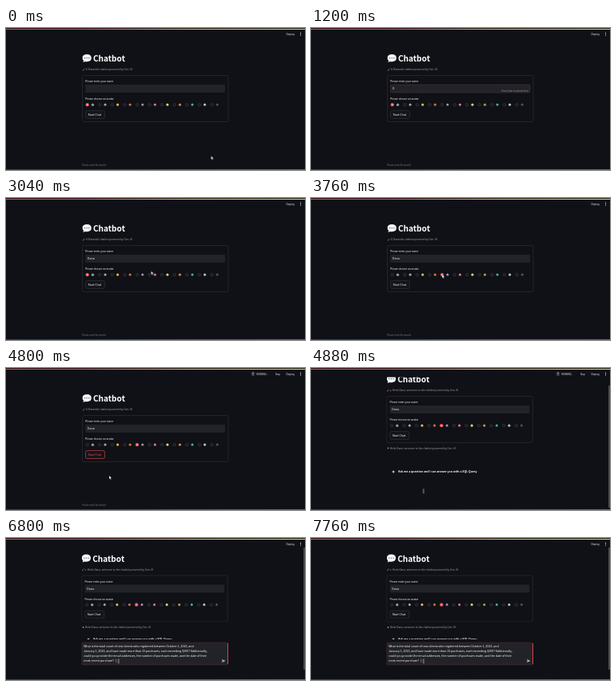
Recreate the animation shown at these times as an HTML page. Size 374 by 178 pixels, loop 8000 ms.

```html
<!DOCTYPE html>
<html lang="en">
<head>
<meta charset="utf-8">
<title>Chatbot</title>
<style>
html, body { margin: 0; width: 100%; height: 100%; overflow: hidden; background: #0f1116; }
svg { display: block; width: 100vw; height: 100vh; }
text { font: 500 3.2px "Noto Sans CJK JP", "Noto Sans CJK SC", "Open Sans", sans-serif; fill: #fff; white-space: pre; }
.h1 { font-size: 10.15px; font-weight: 700; }
.body { font-size: 3.6px; }
.bold { font-size: 3.5px; font-weight: 700; }
.tiny { font-size: 2.75px; }
.dim { fill: #a0a2a8; font-weight: 400; }
.faint { fill: #74767e; font-weight: 400; }
.field { fill: #222328; }

/* 1% of the loop is 80 ms */
.a { animation: 8s step-end infinite; }
.page { animation-name: page; }
.before { animation-name: before; }
.after { animation-name: after; }
.message { animation-name: message; }
.bar { animation-name: bar; }
.dock { animation-name: dock; }
.focus { animation-name: focus; }
.hint { animation-name: hint; }
.first { animation-name: first; }
.fifth { animation-name: fifth; }
.run { animation-name: run; }
.press { animation-name: press; }
.small { animation-name: small; }
.ring { animation-name: ring; }
.big { animation-name: big; }
.blink { animation-name: blink; }
.arrow { animation-name: arrow; }
.beam { animation-name: beam; }
.move { animation: move 8s linear infinite; }
.k1 { animation-name: k1; }
.k2 { animation-name: k2; }
.k3 { animation-name: k3; }
.k4 { animation-name: k4; }

@keyframes page {
  0% { transform: translate(0, 0); }
  61% { transform: translate(-.75px, -24px); }
  62% { transform: translate(-.75px, -12.5px); }
}
@keyframes before { 0% { opacity: 1; } 61% { opacity: 0; } }
@keyframes after { 0% { opacity: 0; } 61% { opacity: 1; } }
@keyframes message {
  0% { transform: translateY(0); opacity: 0; }
  61% { transform: translateY(14.5px); opacity: 1; }
  62% { transform: translateY(0); opacity: 1; }
}
@keyframes bar {
  0% { transform: translateY(0); opacity: 0; }
  61% { transform: translateY(10px); opacity: 1; }
  62% { transform: translateY(0); opacity: 1; }
}
@keyframes dock { 0% { opacity: 0; } 62% { opacity: 1; } }
@keyframes focus { 0% { opacity: 0; } 6% { opacity: 1; } 38% { opacity: 0; } }
@keyframes hint { 0% { opacity: 0; } 13% { opacity: 1; } 38% { opacity: 0; } }
@keyframes first { 0% { opacity: 1; } 46% { opacity: 0; } }
@keyframes fifth { 0% { opacity: 0; } 46% { opacity: 1; } }
@keyframes run { 0% { opacity: 0; } 58% { opacity: 1; } 63% { opacity: 0; } }
@keyframes press { 0% { opacity: 0; } 56% { opacity: 1; } 61% { opacity: 0; } }
@keyframes small { 0% { opacity: 1; } 83% { opacity: 0; } }
@keyframes ring { 0% { opacity: 0; } 81% { opacity: 1; } 83% { opacity: 0; } }
@keyframes big { 0% { opacity: 0; } 83% { opacity: 1; } }
@keyframes blink { 0% { opacity: 1; } 88% { opacity: 0; } 96% { opacity: 1; } }
@keyframes arrow { 0% { opacity: 1; } 2% { opacity: 0; } 34% { opacity: 1; } 61% { opacity: 0; } }
@keyframes beam { 0% { opacity: 0; } 2% { opacity: 1; } 11% { opacity: 0; } 31% { opacity: 1; } 34% { opacity: 0; } 61% { opacity: 1; } }
@keyframes move {
  0%, 1.9% { transform: translate(256.5px, 160.5px); }
  2%, 31% { transform: translate(190px, 76px); }
  37% { transform: translate(184px, 91px); }
  45%, 49% { transform: translate(164px, 96px); }
  56%, 59.9% { transform: translate(113px, 107px); }
  60%, 60.9% { transform: translate(129px, 135px); }
  61%, 100% { transform: translate(140.7px, 154.4px); }
}
@keyframes k1 { 0% { fill-opacity: 0; } 13% { fill-opacity: 1; } }
@keyframes k2 { 0% { fill-opacity: 0; } 16% { fill-opacity: 1; } }
@keyframes k3 { 0% { fill-opacity: 0; } 20% { fill-opacity: 1; } }
@keyframes k4 { 0% { fill-opacity: 0; } 24% { fill-opacity: 1; } }
</style>
</head>
<body>
<svg viewBox="0 0 374 178" preserveAspectRatio="none">
  <defs>
    <linearGradient id="strip">
      <stop offset="0" stop-color="#f04848"/>
      <stop offset=".25" stop-color="#e64a48"/>
      <stop offset=".6" stop-color="#e3b457"/>
      <stop offset="1" stop-color="#e6dc78"/>
    </linearGradient>
    <g id="send"><path d="M270 152l4.4 2-4.4 2 .4-1.6 2-.4-2-.4z" fill="#c4c6cc"/></g>
  </defs>
  <rect width="374" height="178" fill="#0f1116"/>

  <g class="a page">
    <!-- title -->
    <path d="M101.2 33q5.6 0 5.6 4.6t-5.6 4.6q-1.2 0-2.2-.3l-2.6 1 .7-2q-1.5-1.2-1.5-3.3 0-4.6 5.6-4.6z" fill="#f4f5f6"/>
    <g fill="#3b3e45"><circle cx="98.6" cy="37.6" r=".7"/><circle cx="101.2" cy="37.6" r=".7"/><circle cx="103.8" cy="37.6" r=".7"/></g>
    <text class="h1" x="108.9" y="42.1">Chatbot</text>

    <path d="M95.6 53.7l1-2.2 1.3 1.2z" fill="#8a6471"/>
    <circle cx="98.2" cy="51.3" r=".5" fill="#8d8190"/>
    <g class="a before"><text class="dim" x="100" y="53.3">A Streamlit chatbot powered by Gen. AI</text></g>
    <g class="a after">
      <path d="M99.4 53.5l1-2.2 1.2 1.2z" fill="#b0486a"/>
      <text class="dim" x="102.6" y="53.3">Hello Dana, welcome to the chatbot powered by Gen. AI</text>
    </g>

    <!-- form -->
    <rect x="95.5" y="59.5" width="182.5" height="58" rx="2" fill="none" stroke="#3b3d45" stroke-width=".45"/>
    <text x="99.3" y="68">Please enter your name</text>
    <rect class="field" x="99.3" y="71" width="174.7" height="10" rx="1.2"/>
    <rect class="a focus" x="99.3" y="71" width="174.7" height="10" rx="1.2" fill="none" stroke="#7a4148" stroke-width=".35"/>
    <text class="body" x="102" y="77.3"><tspan class="a k1">D</tspan><tspan class="a k2">a</tspan><tspan class="a k3">n</tspan><tspan class="a k4">a</tspan></text>
    <text class="a hint tiny dim" x="272" y="79.6" text-anchor="end">Press Enter to submit form</text>
    <text x="99.3" y="90.1">Please choose an avatar</text>
    <g id="radios"></g>
    <rect x="99.5" y="103.5" width="24" height="10" rx="2" fill="#13151b" stroke="#46484f" stroke-width=".4"/>
    <text class="body" x="102.4" y="109.8">Start Chat</text>
    <g class="a press">
      <rect x="99.5" y="103.5" width="24" height="10" rx="2" fill="#13151b" stroke="#ff4b4b" stroke-width=".5"/>
      <text class="body" x="102.4" y="109.8" style="fill:#ff4b4b">Start Chat</text>
    </g>

    <!-- greeting and reply -->
    <g class="a after">
      <circle cx="97.2" cy="124.5" r="1" fill="#8b8e99"/>
      <text class="dim" x="99.4" y="125.6">Hello Dana, welcome to the chatbot powered by Gen. AI</text>
    </g>
    <g class="a message">
      <circle cx="103.8" cy="139.6" r="1.7" fill="#8d4fb0"/>
      <circle cx="103.8" cy="139.4" r=".9" fill="#ecdcf2"/>
      <text class="bold" x="109.8" y="140.8">Ask me a question and I can answer you with a SQL Query.</text>
    </g>
  </g>

  <text class="a before faint" x="95.3" y="173">Made with Streamlit</text>

  <!-- chat input -->
  <g class="a dock">
    <g class="a small">
      <rect class="field" x="94.8" y="149" width="182.7" height="10" rx="1.2"/>
      <text class="body faint" x="97.2" y="155.2">Your question</text>
      <use href="#send"/>
    </g>
    <rect class="a ring" x="94.8" y="149" width="182.7" height="10" rx="1.2" fill="none" stroke="#ff4b4b" stroke-width=".4"/>
    <g class="a big">
      <rect x="90" y="127" width="194" height="50" fill="#0f1116"/>
      <rect class="field" x="94.8" y="131" width="182.7" height="28" rx="1.2"/>
      <rect x="94.8" y="131" width="182.7" height="28" rx="1.2" fill="none" stroke="#ff4b4b" stroke-width=".4" opacity=".35"/>
      <path d="M277.5 132v26" stroke="#f04848" stroke-width=".9"/>
      <g id="query"></g>
      <rect class="a blink" x="137.7" y="151.7" width=".35" height="4.2" fill="#f4f4f6"/>
      <use href="#send"/>
    </g>
  </g>

  <!-- toolbar -->
  <rect width="374" height="11.5" fill="#0f1116"/>
  <g class="a run">
    <g fill="none" stroke="#b4b6bb" stroke-width=".6">
      <circle cx="309" cy="5.6" r=".5"/><path d="M306.7 7h4.6M309 6.3v2l-1.4 1.6M309 8.3l1.4 1.6"/>
    </g>
    <text class="tiny" x="313.6" y="8.6">RUNNING...</text>
    <text class="tiny" x="337" y="8.6">Stop</text>
  </g>
  <text x="350.6" y="8.6">Deploy</text>
  <g fill="#fff"><circle cx="368.5" cy="6" r=".5"/><circle cx="368.5" cy="7.6" r=".5"/><circle cx="368.5" cy="9.2" r=".5"/></g>
  <rect class="a bar" x="372" y="12" width="2" height="153" fill="#484a51"/>
  <rect y="1" width="374" height="1" fill="url(#strip)"/>
  <rect y="177.2" width="374" height=".8" fill="url(#strip)" opacity=".55"/>

  <!-- pointer -->
  <g class="move">
    <path class="a arrow" d="M0 0v4.2l1-.9.8 1.7.8-.4-.8-1.6h1.4z" fill="#fff" stroke="#111" stroke-width=".25"/>
    <path class="a beam" d="M-1-2.2q1 0 1 .6V1.6q0 .6-1 .6M1-2.2q-1 0-1 .6M1 2.2q-1 0-1-.6" fill="none" stroke="#fff" stroke-width=".5"/>
  </g>
</svg>
<script>
const faces = [
  ["#aeb3ba", "#3f6f86"], ["#8b8790", "#d0c8c8"], ["#d9a13b", "#f4dc83"],
  ["#b4602d", "#e49a4d"], ["#8661a8", "#d9cce2"], ["#cf5578", "#f1a5b5"],
  ["#d6b552", "#fff0b0"], ["#c9783c", "#94ad55"], ["#318b91", "#86cbc7"],
  ["#9fa6af", "#e8eaec"], ["#3d4250", "#666d80"]
];
const dot = (x, r, fill, more = "", y = 96.2) =>
  `<circle cx="${x}" cy="${y}" r="${r}" fill="${fill}" ${more}/>`;
const marked = (x, name) =>
  `<g class="a ${name}">${dot(x, 2.1, "#ff4b4b")}${dot(x, .75, "#fff")}</g>`;

document.getElementById("radios").innerHTML = faces.map(([main, light], i) => {
  const x = 101.7 + i * 15.57;
  const mark = i === 0 ? marked(x, "first") : i === 4 ? marked(x, "fifth") : "";
  return dot(x, 1.8, "#191b21", 'stroke="#4c4e57" stroke-width=".4"') + mark +
    dot(x + 6.8, 1.6, main) + dot(x + 6.8, .8, light, "", 95.8);
}).join("");

document.getElementById("query").innerHTML = [
  "What is the total count of new clients who registered between October 1, 2023, and",
  "January 1, 2023, and have made more than 15 purchases, each exceeding $200? Additionally,",
  "could you provide the email addresses, the number of purchases made, and the date of their",
  "most recent purchase?"
].map((line, i) => `<text class="body" x="97.2" y="${137.2 + i * 6}">${line}</text>`).join("");
</script>
</body>
</html>
```
